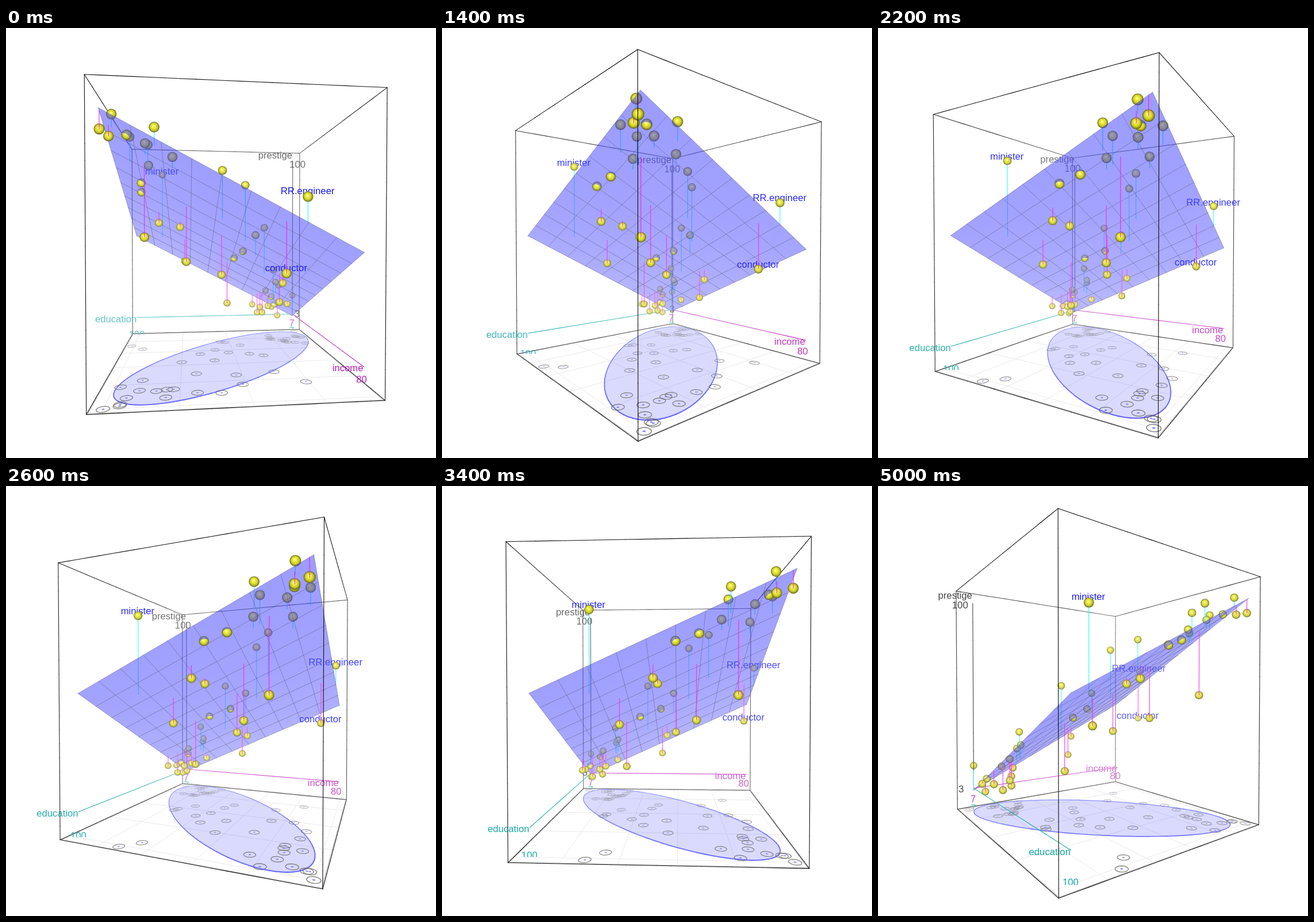
An HTML page with a canvas that plays this animation: 748 px wide and 748 px high, repeating every 5200 ms.

```html
<!DOCTYPE html>
<html lang="en">
<head>
<meta charset="utf-8">
<title>Rotating 3D regression</title>
<style>
html, body { margin: 0; width: 100%; height: 100%; overflow: hidden; background: #fff; }
canvas { display: block; width: 748px; height: 748px; }
</style>
</head>
<body>
<canvas id="stage" width="748" height="748"></canvas>
<script>
const ctx = document.getElementById('stage').getContext('2d');

// income, education, prestige
const people = [
  [62,86,82],[72,76,83],[75,92,90],[55,90,76],[64,86,90],[21,84,87],[64,93,93],[80,100,90],[67,87,52],
  [72,86,88],[42,74,57],[76,98,89],[76,97,97],[41,84,59],[48,91,73],[76,34,38],[53,45,76],[60,56,81],
  [42,44,45],[78,82,92],[29,72,39],[48,55,34],[55,71,41],[29,50,16],[21,23,33],[47,39,53],[81,28,67],
  [36,32,57],[22,22,26],[44,25,29],[15,29,10],[7,7,15],[42,26,19],[9,19,10],[21,15,13],[21,20,24],
  [16,26,20],[16,28,7],[9,17,3],[14,22,16],[12,30,6],[17,25,11],[7,20,8],[34,47,41],[8,32,10]
];
const pointNames = { 5: 'minister', 15: 'conductor', 26: 'RR.engineer' };

const STEP_MS = 200, STEPS = 26, START_DEG = 84.1, STEP_DEG = 4.804;
const CX = 383.5, CY = 374, FOCAL = 648, DIST = 1.605;
const SIN_P = 0.0155, COS_P = Math.sqrt(1 - SIN_P * SIN_P);
const SCALE = 0.8415, BASE = -0.408, BASE_Y = -0.4;
const HALF_W = 0.465, HALF_H = 0.5, RADIUS = 0.0168;

const BLACK = [0, 0, 0], BLUE = [0, 0, 255], MAGENTA = [175, 0, 175], TEAL = [0, 160, 157];
const ABOVE = [0, 255, 255], BELOW = [255, 0, 235], SURFACE = [50, 50, 255];

const scaleX = v => (v - 7) / 74, scaleZ = v => (v - 7) / 93, scaleY = v => (v - 3) / 97;
const world = (x, y, z) => [BASE + SCALE * x, BASE_Y + SCALE * y, BASE + SCALE * z];

// regression plane in scaled units
const SLOPE_X = 0.5987 * 74 / 97, SLOPE_Z = 0.5458 * 93 / 97;
const ORIGIN_Y = scaleY(-6.0647 + (0.5987 + 0.5458) * 7);
const fit = (x, z) => ORIGIN_Y + SLOPE_X * x + SLOPE_Z * z;
const NORM = Math.hypot(SLOPE_X, 1, SLOPE_Z);
const normal = [-SLOPE_X / NORM, 1 / NORM, -SLOPE_Z / NORM];
const planeRoot = world(0, ORIGIN_Y, 0);
const planeDist = p => normal.reduce((sum, n, i) => sum + n * (p[i] - planeRoot[i]), 0);

let cosT, sinT, cameraSide, items;

function project([u, v, w]) {
  const x = u * cosT - w * sinT, z = u * sinT + w * cosT;
  const d = DIST - (v * SIN_P + z * COS_P);
  return { x: CX + FOCAL * x / d, y: CY - FOCAL * (v * COS_P - z * SIN_P) / d, d };
}

const fog = d => 1 - Math.exp(-((d / 2.5) ** 3));
function shade(rgb, d, alpha = 1) {
  const f = fog(d);
  return `rgba(${rgb.map(c => Math.round(c + (255 - c) * f))},${alpha})`;
}
const mix = (a, b, t) => a.map((c, i) => c + (b[i] - c) * t);
const isFront = p => planeDist(p) * cameraSide > 0;
const add = (d, front, draw) => items.push({ d, front, draw });

function tracePath(points, close) {
  ctx.beginPath();
  points.map(project).forEach(p => ctx.lineTo(p.x, p.y));
  if (close) ctx.closePath();
}

function stroke(a, b, color, width = 1) {
  ctx.strokeStyle = color;
  ctx.lineWidth = width;
  tracePath([a, b]);
  ctx.stroke();
}

function addLine(a, b, rgb, pieces) {
  for (let i = 0; i < pieces; i++) {
    const p = mix(a, b, i / pieces), q = mix(a, b, (i + 1) / pieces), mid = mix(p, q, 0.5);
    const d = project(mid).d;
    add(d, isFront(mid), () => stroke(p, q, shade(rgb, d), 1.1));
  }
}

function addText(text, at, rgb, align = 'center') {
  const p = project(at), floorY = project([at[0], -HALF_H, at[2]]).y - 3;
  add(p.d + 0.001, isFront(at), () => {
    ctx.save();
    ctx.beginPath();
    ctx.rect(0, 0, 748, floorY);
    ctx.clip();
    ctx.font = '16.7px "Liberation Sans", Arial, sans-serif';
    ctx.textAlign = align;
    ctx.fillStyle = shade(rgb, p.d);
    ctx.fillText(text, p.x - 0.8, p.y + 8);
    ctx.restore();
  });
}

function drawBall(p, r) {
  const g = ctx.createRadialGradient(p.x - r * 0.15, p.y - r * 0.25, 0, p.x, p.y, r);
  g.addColorStop(0, shade([255, 255, 200], p.d));
  g.addColorStop(0.25, shade([242, 242, 50], p.d));
  g.addColorStop(0.65, shade([205, 205, 20], p.d));
  g.addColorStop(0.9, shade([125, 125, 8], p.d));
  g.addColorStop(1, shade([70, 70, 0], p.d));
  ctx.fillStyle = g;
  ctx.beginPath();
  ctx.arc(p.x, p.y, r, 0, 7);
  ctx.fill();
}

// Keeps only the cap of the ball on the camera's side of the plane.
function drawCap(center, p, r) {
  const dist = planeDist(center) * cameraSide;
  const tip = project(center.map((c, i) => c + normal[i] * cameraSide * RADIUS));
  const dx = tip.x - p.x, dy = tip.y - p.y;
  const sin = Math.min(1, Math.hypot(dx, dy) / r), cos = Math.sqrt(1 - sin * sin);
  const ring = r * Math.sqrt(1 - (dist / RADIUS) ** 2);
  ctx.save();
  ctx.translate(p.x, p.y);
  ctx.rotate(Math.atan2(dy, dx) + Math.PI / 2);
  ctx.translate(0, dist / RADIUS * r * sin);
  ctx.beginPath();
  ctx.rect(-2 * r, -4 * r, 4 * r, 4 * r);
  ctx.ellipse(0, 0, ring, ring * cos, 0, 0, 2 * Math.PI);
  ctx.clip();
  ctx.setTransform(1, 0, 0, 1, 0, 0);
  drawBall(p, r);
  ctx.restore();
}

function addPerson([income, education, prestige], index) {
  const x = scaleX(income), z = scaleZ(education), y = scaleY(prestige);
  const center = world(x, y, z), foot = world(x, fit(x, z), z);
  const p = project(center), r = RADIUS * FOCAL / p.d;
  const front = isFront(center);
  addLine(center, foot, y > fit(x, z) ? ABOVE : BELOW, 1);
  if (pointNames[index]) addText(pointNames[index], world(x, y + 0.027, z), BLUE);
  if (Math.abs(planeDist(center)) < RADIUS) {
    add(p.d, false, () => drawBall(p, r));
    add(p.d, true, () => drawCap(center, p, r));
  } else {
    add(p.d, front, () => drawBall(p, r));
  }
}

function addBox() {
  const corner = (i, v) => [HALF_W * (i & 2 ? 1 : -1), v, HALF_W * ((i + 1) & 2 ? 1 : -1)];
  for (let i = 0; i < 4; i++) {
    for (const v of [-HALF_H, HALF_H]) addLine(corner(i, v), corner(i + 1, v), BLACK, 20);
    addLine(corner(i, -HALF_H), corner(i, HALF_H), BLACK, 20);
  }
}

function addAxes() {
  const origin = world(0, 0, 0);
  addLine(origin, world(1, 0, 0), MAGENTA, 10);
  addLine(origin, world(0, 1, 0), BLACK, 10);
  addLine(origin, world(0, 0, 1), TEAL, 10);
  addText('income', world(1, 0, 0), MAGENTA, 'right');
  addText('prestige', world(0, 1.05, 0), BLACK, 'right');
  addText('education', world(0, 0, 1), TEAL, 'right');
  addText('7', world(0, -0.05, 0), MAGENTA);
  addText('80', world(scaleX(80), -0.05, 0), MAGENTA);
  addText('3', world(-0.05, 0, -0.05), BLACK);
  addText('100', world(-0.05, 1, -0.05), BLACK);
  addText('7', world(0, -0.1, 0), TEAL);
  addText('100', world(0, -0.1, 1), TEAL);
}

const circle = (n, at) => Array.from({ length: n }, (_, i) => at(i / n * 2 * Math.PI));

// The floor plot lies transposed: education runs along the income axis.
function floorPoint(income, education) {
  const stretch = t => 1.02 * t - 0.018;
  const [u, , w] = world(stretch(scaleZ(education)), 0, stretch(scaleX(income)));
  return [u, -HALF_H, w];
}

function drawFloor() {
  const y = -HALF_H, w = HALF_W;
  for (let t = 20; t <= 100; t += 20) {
    const [u, , v] = floorPoint(t, t);
    stroke([u, y, -w], [u, y, w], '#ebebeb');
    if (t < 100) stroke([-w, y, v], [w, y, v], '#ebebeb');
  }
  const e = w - 0.003;
  tracePath([[-e, y, -e], [e, y, -e], [e, y, e], [-e, y, e]], true);
  ctx.strokeStyle = '#c8c8c8';
  ctx.lineWidth = 1.5;
  ctx.stroke();

  const k = 1.53, corr = 0.7245, rest = Math.sqrt(1 - corr * corr);
  const rim = circle(90, a => floorPoint(41.87 + 24.435 * k * Math.cos(a),
    52.56 + 29.76 * k * (corr * Math.cos(a) + rest * Math.sin(a))));
  tracePath(rim, true);
  ctx.fillStyle = 'rgba(0,0,255,.145)';
  ctx.fill();
  rim.forEach((p, i) => {
    const d = project(p).d;
    stroke(p, rim[(i + 1) % rim.length], shade([90, 90, 255], d), 2.3 / d);
  });

  for (const [income, education] of people) {
    const [u, , v] = floorPoint(income, education);
    const disc = r => circle(20, a => [u + r * Math.cos(a), y, v + r * Math.sin(a)]);
    const d = project([u, y, v]).d;
    tracePath(disc(0.02), true);
    ctx.strokeStyle = shade([80, 80, 80], d, 0.7);
    ctx.lineWidth = 1.7 / d;
    ctx.stroke();
    tracePath(disc(0.0045), true);
    ctx.fillStyle = shade([60, 60, 255], d, 0.6);
    ctx.fill();
  }
}

function drawPlane() {
  const at = (x, z) => world(x, fit(x, z), z);
  const corners = [at(0, 0), at(1, 0), at(1, 1), at(0, 1)];
  const [a, b, c] = corners.map(project);

  // 1/depth is linear on screen, so the fog runs along one straight gradient.
  const bx = b.x - a.x, by = b.y - a.y, cx = c.x - a.x, cy = c.y - a.y;
  const qa = 1 / a.d, qb = 1 / b.d - qa, qc = 1 / c.d - qa, det = bx * cy - by * cx;
  const gx = (qb * cy - qc * by) / det, gy = (bx * qc - cx * qb) / det;
  const len = gx * gx + gy * gy, depths = corners.map(p => 1 / project(p).d);
  const lo = Math.min(...depths), hi = Math.max(...depths);
  const end = q => [a.x + gx * (q - qa) / len, a.y + gy * (q - qa) / len];
  const g = ctx.createLinearGradient(...end(lo), ...end(hi));
  for (let i = 0; i <= 6; i++) {
    g.addColorStop(i / 6, shade(SURFACE, 0.85 / (lo + (hi - lo) * i / 6), 0.5));
  }
  tracePath(corners, true);
  ctx.fillStyle = g;
  ctx.fill();

  for (let i = 0; i <= 9; i++) {
    const t = i / 9;
    stroke(at(t, 0), at(t, 1), 'rgba(75,75,95,.45)', 0.9);
    stroke(at(0, t), at(1, t), 'rgba(75,75,95,.45)', 0.9);
  }
}

function drawScene(step) {
  const angle = (START_DEG - STEP_DEG * step) * Math.PI / 180;
  cosT = Math.cos(angle);
  sinT = Math.sin(angle);
  const flat = DIST * COS_P;
  cameraSide = Math.sign(planeDist([flat * sinT, DIST * SIN_P, flat * cosT]));
  items = [];
  addBox();
  addAxes();
  people.forEach(addPerson);
  items.sort((p, q) => q.d - p.d);

  ctx.fillStyle = '#fff';
  ctx.fillRect(0, 0, 748, 748);
  ctx.lineCap = 'round';
  drawFloor();
  items.filter(i => !i.front).forEach(i => i.draw());
  drawPlane();
  items.filter(i => i.front).forEach(i => i.draw());
}

const start = performance.now();
let shown = -1;
function tick() {
  const step = Math.floor((performance.now() - start) / STEP_MS) % STEPS;
  if (step !== shown) drawScene(shown = step);
  requestAnimationFrame(tick);
}
tick();
</script>
</body>
</html>
```
